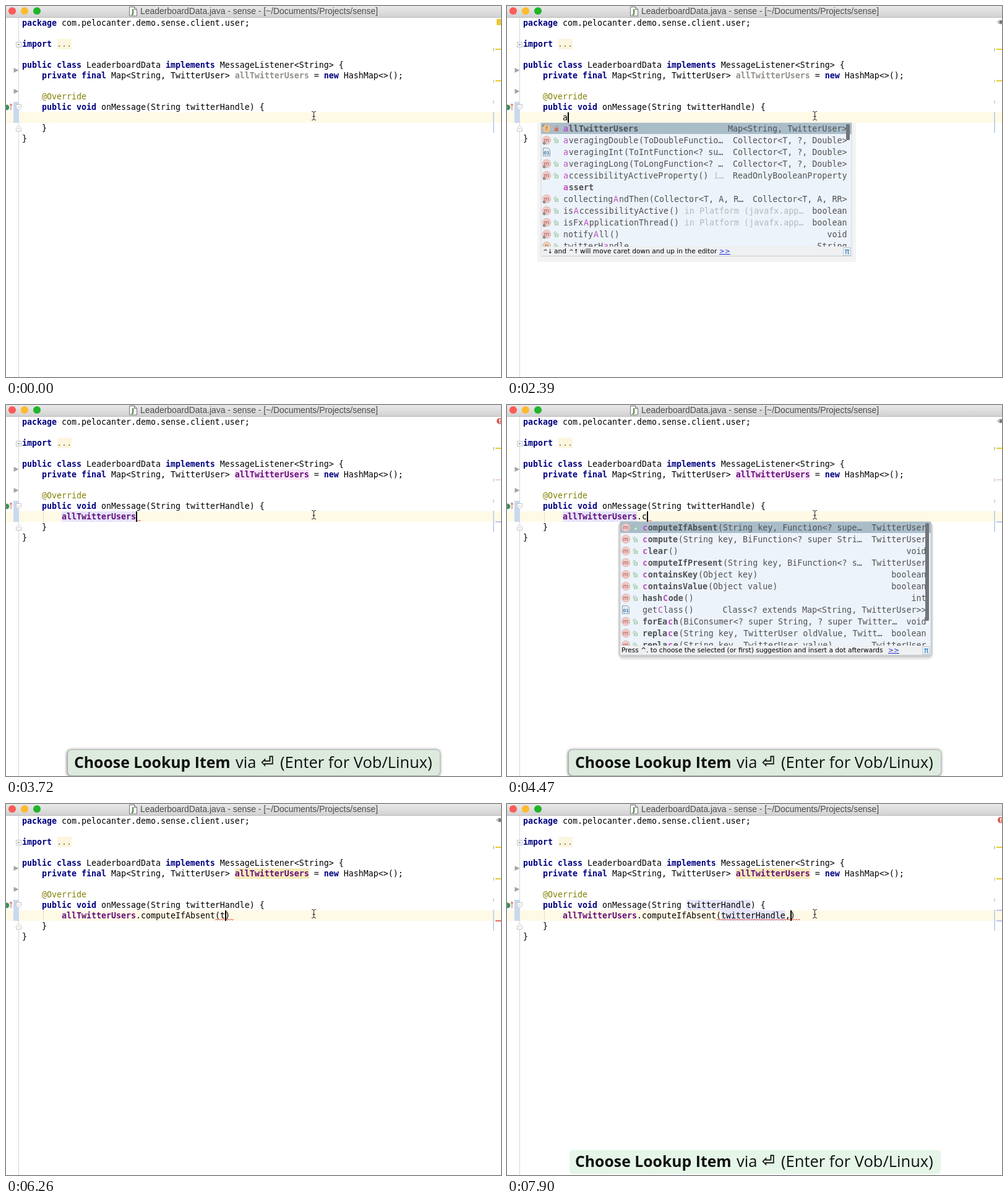
An HTML page for the animation above (8000 ms loop, 800 by 600 pixels).

```html
<!DOCTYPE html>
<html lang="en">
<head>
<meta charset="utf-8">
<title>Code completion</title>
<style>
html, body { margin: 0; width: 100%; height: 100%; overflow: hidden; background: #fff; }
svg { display: block; width: 800px; height: 600px; }
text { white-space: pre; }
.code { font: 13.29px "DejaVu Sans Mono", monospace; fill: #000; }
.list { font: 13.34px "DejaVu Sans Mono", monospace; fill: #505255; }
.hint { font: 10.6px "DejaVu Sans", sans-serif; fill: #000; }
.title { font: 13.9px "Liberation Sans", sans-serif; fill: #4c4c4c; }
.banner { font: 25.5px "Open Sans", sans-serif; fill: #111; }
.banner .b { font-size: 24.8px; }
.enter { font: 25px "DejaVu Sans", sans-serif; fill: #111; stroke: #111; stroke-width: .5px; }
.glyph { font: 9px "DejaVu Sans", sans-serif; text-anchor: middle; }
.b, .k, .f, .g { font-weight: bold; }
.k { fill: #000080; }
.f { fill: #660e7a; }
.g { fill: #929088; }
.o { fill: #808000; }
.d { fill: #87773c; }
.m { fill: #c050c4; }
.t { fill: #b5b9bd; }
</style>
</head>
<body>
<svg viewBox="0 0 800 600">
  <defs>
    <linearGradient id="bar" x2="0" y2="1">
      <stop stop-color="#e9e9e9"/><stop offset="1" stop-color="#d2d2d2"/>
    </linearGradient>
    <filter id="blur" x="-5%" y="-20%" width="110%" height="140%"><feGaussianBlur stdDeviation="2"/></filter>
  </defs>
  <g id="stage"></g>
</svg>
<script>
const LOOP = 8000, CHAR = 8, LEFT = 26, INDENT = 90, ROW = 19, LIST_TOP = 189;
const stage = document.getElementById('stage');

const esc = s => s.replace(/&/g, '&amp;').replace(/</g, '&lt;');
const rect = (x, y, w, h, fill, more = '') =>
  `<rect x="${x}" y="${y}" width="${w}" height="${h}" fill="${fill}" ${more}/>`;
const disc = (x, y, r, fill, more = '') => `<circle cx="${x}" cy="${y}" r="${r}" fill="${fill}" ${more}/>`;
const path = (d, stroke, fill = 'none', w = 1) =>
  `<path d="${d}" stroke="${stroke}" fill="${fill}" stroke-width="${w}"/>`;
const span = (cls, s, dx = 0) => s ? `<tspan class="${cls}" dx="${dx}">${esc(s)}</tspan>` : '';
const text = (x, y, cls, body, more = '') => `<text x="${x}" y="${y}" class="${cls}" ${more}>${body}</text>`;
const lineTop = n => 19 + 17 * n;
// runs alternate between a style class and its text
const code = (n, col, ...runs) => {
  let body = '';
  for (let i = 0; i < runs.length; i += 2) body += span(runs[i], runs[i + 1]);
  return text(LEFT + col * CHAR, lineTop(n) + 13, 'code', body);
};

const lists = {
  a: {
    x: 55, prefix: 'a', thumb: 26, hint: 'move',
    rows: [
      'f|+allTwitterUsers|||Map<String, TwitterUser>',
      's|averagingDouble|(ToDoubleFunctio…||Collector<T, ?, Double>',
      'o|averagingInt|(ToIntFunction<? su…||Collector<T, ?, Double>',
      's|averagingLong|(ToLongFunction<? …||Collector<T, ?, Double>',
      's|accessibilityActiveProperty|()| i…|ReadOnlyBooleanProperty',
      '|+assert|||',
      's|collectingAndThen|(Collector<T, A, R…||Collector<T, A, RR>',
      's|isAccessibilityActive|()| in Platform (javafx.app…|boolean',
      's|isFxApplicationThread|()| in Platform (javafx.app…|boolean',
      's|notifyAll|()||void',
      'p|twitterHandle|||String'
    ]
  },
  c: {
    x: 183, prefix: 'c', thumb: 158,
    rows: [
      'm|+computeIfAbsent|(String key, Function<? supe…||TwitterUser',
      'm|+compute|(String key, BiFunction<? super Stri…||TwitterUser',
      'm|+clear|()||void',
      'm|+computeIfPresent|(String key, BiFunction<? s…||TwitterUser',
      'm|+containsKey|(Object key)||boolean',
      'm|+containsValue|(Object value)||boolean',
      'm|+hashCode|()||int',
      'o|getClass|()||Class<? extends Map<String, TwitterUser>>',
      'm|+forEach|(BiConsumer<? super String, ? super Twitter…||void',
      'm|+replace|(String key, TwitterUser oldValue, Twitt…||boolean',
      'm|+replace|(String key, TwitterUser value)||TwitterUser'
    ]
  },
  tw: {
    x: 310, prefix: 'tw', width: 470,
    rows: ['p|+twitterHandle|||String', 'm|TwitterUser|||']
  }
};
lists.com = { x: 183, prefix: 'com', wide: 4, rows: [0, 1, 3].map(i => lists.c.rows[i]) };

const CALL = '.computeIfAbsent(';
// each step overrides the state left by the one before
const steps = [
  [0, { head: '', word: '', tail: '', caret: 0, icon: 'warn', mark: 'unused' }],
  [300, { caret: 1 }],
  [740, { caret: 0 }],
  [1190, { caret: 1 }],
  [1790, { caret: 0 }],
  [2240, { word: 'a', caret: 1, icon: 'eye' }],
  [2390, { list: 'a', soft: 1 }],
  [2530, { soft: 0 }],
  [2680, { icon: 'pause' }],
  [3120, { list: '', head: 'allTwitterUsers', word: '', icon: 'eye' }],
  [3270, { banner: 1 }],
  [3420, { banner: 2 }],
  [3570, { mark: 'linked' }],
  [3720, { icon: 'error', wave: [212, 218] }],
  [4170, { word: '.', icon: 'eye', wave: [220, 226] }],
  [4320, { word: '.c', wave: [228, 234] }],
  [4470, { list: 'c' }],
  [4620, { word: '.co', wave: [236, 242], icon: 'pause' }],
  [4770, { word: '.com', wave: [244, 250] }],
  [4920, { list: 'com' }],
  [5220, { list: '', word: CALL, tail: ')', wave: null, banner: 0, icon: 'eye' }],
  [5660, { caret: 0, mark: 'used', icon: 'error', wave: [338, 361], fault: 1 }],
  [6260, { word: CALL + 't', caret: 1, wave: [338, 369], icon: 'eye' }],
  [6410, { word: CALL + 'tw', wave: [338, 377] }],
  [6560, { list: 'tw' }],
  [6710, { icon: 'pause' }],
  [7000, { list: '', word: CALL + 'twitterHandle', wave: [338, 466], banner: 1, icon: 'eye' }],
  [7300, { param: 1, fault: 0 }],
  [7450, { icon: 'error' }],
  [7900, { word: CALL + 'twitterHandle,', wave: [338, 474] }]
];

function titleBar() {
  const lights = ['#fc5b57', '#fdbb2d', '#20b52a'];
  return rect(0, 0, 800, 18, 'url(#bar)') + rect(0, 18, 800, 1, '#b9b9b9') +
    lights.map((c, i) => disc(10 + 20 * i, 8, 6.1, c)).join('') +
    path('M199.5 1.5h8l4 4v10.5h-12zM207.5 1.5v4h4', '#777', '#fafafa') +
    text(205, 13, 'glyph', 'J', 'style="font-weight:bold;font-size:10px" fill="#3f7d32"') +
    text(217, 13, 'title', 'LeaderboardData.java - sense - [~/Documents/Projects/sense]');
}

function gutter() {
  const play = y => path(`M12.5 ${y - 4}v8l8-4z`, 'none', '#a5a5a5');
  const fold = (y, d) => path(`M16.5 ${y - 4 * d}h8v${5 * d}l-4 ${4 * d}l-4 ${-4 * d}zM18.5 ${y}h4`, '#c4c4c4', '#fff');
  return rect(20, 19, 1, 581, '#d6d6d6') + rect(12, 155, 9, 34, '#c9d9ee') +
    rect(16.5, 58.5, 8, 8, '#fff', 'stroke="#c4c4c4"') + path('M18.5 62.5h4M20.5 60.5v4', '#999') +
    play(104) + play(138) + fold(163.5, 1) + fold(198.5, -1) +
    disc(1, 164, 4.5, '#4fa56b') + path('M0 162h3v4h-3', '#286b40') +
    path('M8 168.5v-10M6 161l2-3 2 3', '#c95746');
}

function statusIcon(kind) {
  if (kind === 'warn') return rect(793, 21, 7, 10, '#ecc832');
  if (kind === 'error') return disc(798, 26, 5, '#dc5b50') + rect(797, 22.5, 2, 4.5, '#fff') + rect(797, 28, 2, 1.5, '#fff');
  if (kind === 'pause') return rect(795, 22, 2, 8, '#a2a2a2') + rect(799, 22, 1, 8, '#a2a2a2');
  return path('M792.5 26q5.5-6 11 0q-5.5 6-11 0z', '#8a8a8a', '#f2f2f2') + disc(798, 26, 2.5, '#777');
}

function stripe(s) {
  const bar = (y, c) => rect(791, y, 9, 2, c);
  const yellow = '#e9c931', lilac = '#c9c0ee';
  let out = rect(787, 68, 2, 5, '#b0d8b8') + rect(787, 119, 2, 5, '#d5d5d5') +
    rect(787, 153, 2, 5, '#d5d5d5') + rect(787, 171, 2, 34, '#c2d5f0') +
    bar(69, yellow) + bar(120, s.mark === 'linked' ? '#ecccee' : yellow);
  if (s.mark === 'linked') out += bar(188, lilac);
  if (s.param) out += bar(171, lilac) + bar(188, lilac);
  if (s.fault) out += bar(188, '#e06c66');
  return out + statusIcon(s.icon);
}

function wave([from, to]) {
  let d = `M${from} 188`;
  for (let x = from + 2, up = true; x <= to; x += 2, up = !up) d += `L${x} ${up ? 186 : 188}`;
  return path(d, '#e3433c', 'none', 0.9);
}

function editor(s) {
  const typed = s.head + s.word, linked = s.mark === 'linked';
  let out = rect(0, 172, 800, 17, '#fffae6') + rect(83, 53, 23, 17, '#fcf5df');
  if (s.mark !== 'unused') out += rect(370, 104, 120, 17, linked ? '#fbe6fa' : '#f6ebbc');
  if (linked) out += rect(INDENT, 172, 120, 17, '#e6e4fb');
  if (s.param) out += rect(290, 155, 104, 17, '#e6e6fb') + rect(346, 172, 104, 17, '#e6e6fb');
  if (s.head) out += path('M60.5 172v17', '#dcdcd4');
  out += code(0, 0, 'k', 'package', '', ' com.pelocanter.demo.sense.client.user;') +
    code(2, 0, 'k', 'import', '', ' ', 'd', '...') +
    code(4, 0, 'k', 'public class', '', ' LeaderboardData ', 'k', 'implements', '', ' MessageListener<String> {') +
    code(5, 4, 'k', 'private final', '', ' Map<String, TwitterUser> ',
      s.mark === 'unused' ? 'g' : 'f', 'allTwitterUsers', '', ' = ', 'k', 'new', '', ' HashMap<>();') +
    code(7, 4, 'o', '@Override') +
    code(8, 4, 'k', 'public void', '', ' onMessage(String twitterHandle) {') +
    code(9, 8, 'f', s.head, '', s.word + s.tail) +
    code(10, 4, '', '}') + code(11, 0, '', '}');
  if (s.wave) out += wave(s.wave);
  if (s.caret) out += rect(INDENT + CHAR * typed.length, 172, 2, 17, '#000');
  return out;
}

function rowIcon(kind, x, y) {
  if (!kind) return '';
  if (kind === 'o') {
    return path(`M${x + 3.5} ${y - 6.5}h8l3 3v10h-11z`, '#8ba0b5', '#e3ebf3') +
      text(x + 9, y + 4, 'glyph', '01', 'style="font-size:7px;font-weight:bold" fill="#4a7ba6"');
  }
  const fill = { f: '#e9c48d', p: '#eccfae' }[kind] || '#f2c8c4';
  const field = kind === 'f', lock = field ? '#cf7068' : '#8fc49a';
  let out = disc(x + 9, y, 6.8, fill, 'stroke="#c9a09c" stroke-width=".5"') +
    text(x + 9, y + 3, 'glyph', kind === 's' ? 'm' : kind, 'fill="#9c5550"');
  if (kind === 's') out += path(`M${x + 5} ${y + 2}l3 3-3 3-3-3z`, 'none', '#8e8e8e');
  if (field) out += path(`M${x + 2} ${y - 6}h5l-5 4z`, 'none', '#8e8e8e');
  return out + rect(x + 22.5, y, 5, 4, field ? lock : '#d5ebd9', `stroke="${lock}"`) +
    path(`M${x + (field ? 23 : 21)} ${y}v-2q2-3.5 4 0v${field ? 2 : 1}`, lock);
}

function listRow(row, i, p, width) {
  const [icon, label, args, note, type] = row.split('|');
  const bold = label[0] === '+', name = label.replace('+', '');
  const y = LIST_TOP + ROW * i + 9, at = name.toLowerCase().indexOf(p.prefix), end = at + p.prefix.length;
  const b = bold ? 'b' : '', shift = i ? 0 : p.wide || 0;
  // every run starts on a whole pixel, which leaves a small gap before it
  const gap = 0.8;
  const body = at < 0 ? span(b, name)
    : span(b, name.slice(0, at)) + span(b + ' m', name.slice(at, end), at ? gap : 0) + span(b, name.slice(end), gap);
  return rowIcon(icon, p.x, y) +
    text(p.x + 36, y + 5, 'list', body + span('', args, gap) + span('t', note, gap)) +
    text(p.x + width - 7.5 + shift, y + 5, 'list', esc(type), 'text-anchor="end"');
}

function popup(p, soft) {
  const w = p.width || 502, x = p.x, h = Math.min(p.rows.length * ROW, 200), foot = LIST_TOP + h;
  let out = soft
    ? rect(x - 6, LIST_TOP, w + 13, h + 25, '#f3f3f3')
    : rect(x - 4, LIST_TOP, w + 8, h + 23, '#000', 'rx="9" opacity=".08"') +
      rect(x - 2.5, LIST_TOP - 1, w + 5, h + 20.5, '#000', 'rx="7" opacity=".13"');
  out += rect(x, LIST_TOP, w, h + 15, '#edf3fa', 'stroke="#c3c8cc" stroke-width=".6"') +
    rect(x, LIST_TOP, w + (p.wide || 0), ROW - 1, '#a9bdc9');
  out += p.rows.map((r, i) => listRow(r, i, p, w)).join('');
  if (p.thumb) out += rect(x + w - 9, 191, 6, p.thumb, '#70757a', 'rx="2"');
  // the footer also hides the overflow of the last row
  out += rect(x, foot, w, 15, '#eef0f1') + rect(x, foot + 15, w, 1, '#c8cccf');
  const y = foot + 11;
  out += p.hint
    ? text(x + 3, y, 'hint', '^↓', 'style="font-size:9.5px"') + text(x + 21, y, 'hint', 'and') +
      text(x + 45, y, 'hint', '^↑', 'style="font-size:9.5px"') +
      text(x + 63, y, 'hint', 'will move caret down and up in the editor')
    : text(x + 2, y, 'hint', 'Press ^. to choose the selected (or first) suggestion and insert a dot afterwards');
  const link = x + (p.hint ? 288 : 433);
  return out + text(link, y, 'hint', '&gt;&gt;', 'style="fill:#1a2bdc" text-decoration="underline"') +
    rect(x + w - 13.5, foot + 1.5, 12, 13, '#e4eef7', 'stroke="#b8c2ca" stroke-width=".8"') +
    text(x + w - 7.5, foot + 12, 'glyph', 'π', 'style="font-size:12px" fill="#2b77b5"');
}

function banner(level) {
  const box = level > 1
    ? rect(98, 557, 604, 44, '#000', 'rx="7" opacity=".45" filter="url(#blur)"') +
      rect(100, 558, 601, 41, '#dcebdd', 'rx="6"')
    : rect(101, 559.5, 600, 39, '#e5f6e8', 'rx="6"');
  return box + text(110, 587, 'banner', span('b', 'Choose Lookup Item')) +
    text(371, 587, 'banner', 'via') + text(412, 586, 'enter', '⏎') +
    text(443, 587, 'banner', '(Enter for Vob/Linux)');
}

const pointer = path('M494 170.5q3.5 0 3.5 2v10q0 2-3.5 2M501 170.5q-3.5 0-3.5 2v10q0 2 3.5 2M495.5 178.5h4', '#222');

function draw(s) {
  stage.innerHTML = rect(0, 0, 800, 600, '#fff') + editor(s) + gutter() + stripe(s) + titleBar() +
    pointer + (s.list ? popup(lists[s.list], s.soft) : '') + (s.banner ? banner(s.banner) : '');
}

const start = performance.now();
let shown = -1;
function tick() {
  const t = (performance.now() - start) % LOOP;
  const n = steps.filter(([at]) => at <= t).length;
  if (n !== shown) {
    shown = n;
    draw(Object.assign({}, ...steps.slice(0, n).map(step => step[1])));
  }
  requestAnimationFrame(tick);
}
tick();
</script>
</body>
</html>
```
